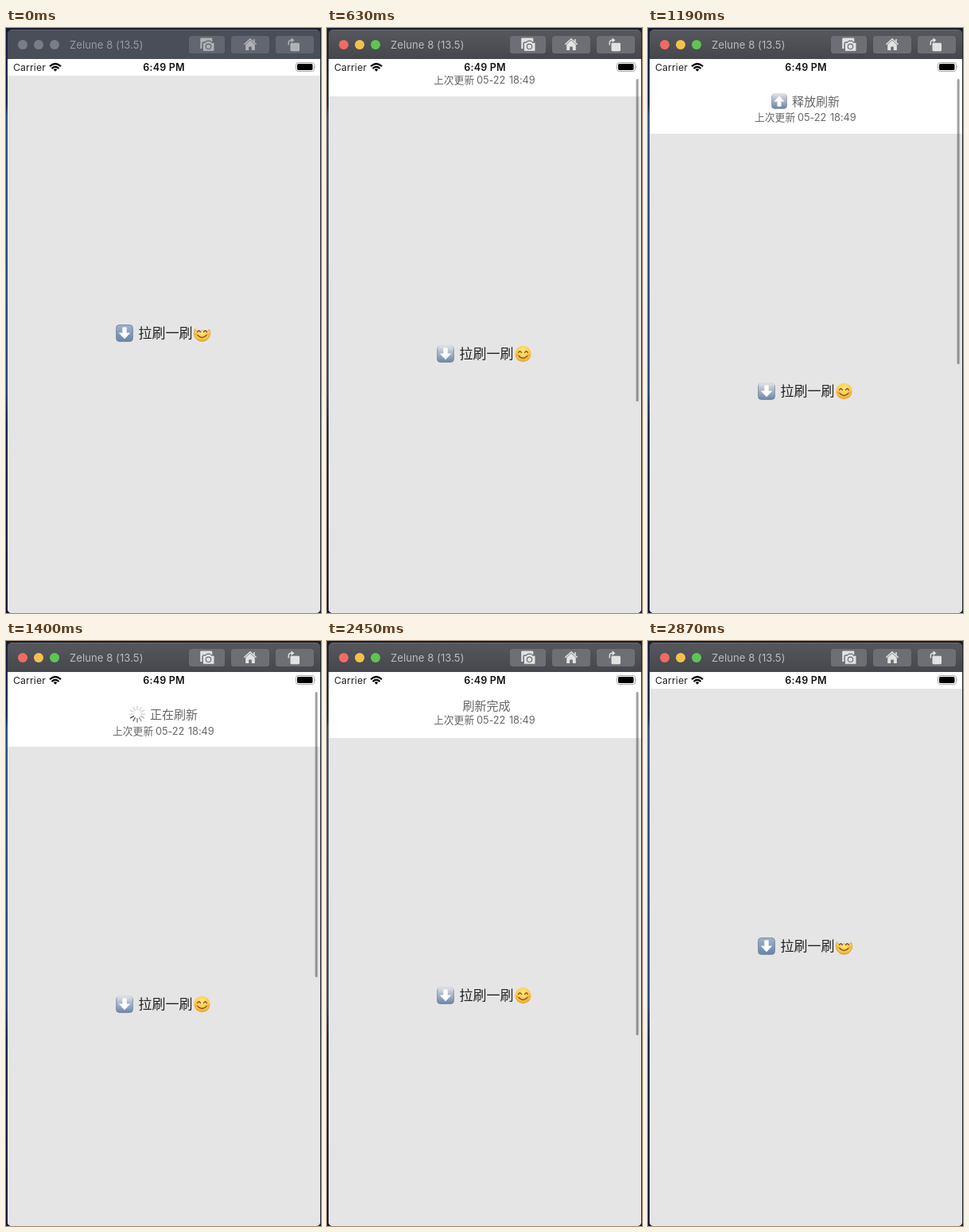
These frames come from a looping animation (396x736 px, 2940 ms). An HTML page:

```html
<!DOCTYPE html>
<html lang="zh">
<head>
<meta charset="utf-8">
<title>Pull to refresh</title>
<style>
  html, body { margin: 0; width: 100%; height: 100%; overflow: hidden; background: #1a2648; }
  svg { display: block; width: 396px; height: 736px; }
  text { font-family: Inter, "Noto Sans CJK SC", "Noto Sans CJK", sans-serif; }
  .name { font-size: 13px; letter-spacing: .1px; fill: #999ba1; }
  .bar { fill: #4a4e58; }
  .light { fill: #7a7d85; }
  .button { fill: #626670; }
  .icon { fill: #afb1b5; stroke: none; }
  .line { fill: none; stroke: #afb1b5; }
  .cut { stroke: #626670; }
  .active .name { fill: #bbbcbf; }
  .active .bar { fill: url(#chrome); }
  .active .button { fill: #6d6f74; }
  .active .icon { fill: #e2e2e3; }
  .active .line { stroke: #e2e2e3; }
  .active .cut { stroke: #6d6f74; }
  .active .red { fill: #ee6c60; }
  .active .yellow { fill: #f5c04f; }
  .active .green { fill: #5fc454; }
  .soft .flat, .full { display: none; }
  .soft .full { display: inline; }
  .box { fill: url(#blue); stroke: #7188a6; }
  .soft .box { fill: url(#fade); stroke: url(#edge); }
</style>
</head>
<body>
<svg id="stage" viewBox="0 0 396 736">
  <defs>
    <linearGradient id="desk" x2="0" y2="1">
      <stop offset="0" stop-color="#151c33"/>
      <stop offset=".13" stop-color="#1b2950"/>
      <stop offset=".15" stop-color="#304d8c"/>
      <stop offset=".62" stop-color="#2a4380"/>
      <stop offset=".68" stop-color="#18244a"/>
      <stop offset="1" stop-color="#141a30"/>
    </linearGradient>
    <linearGradient id="chrome" x2="0" y2="1">
      <stop offset="0" stop-color="#56585d"/>
      <stop offset="1" stop-color="#45474c"/>
    </linearGradient>
    <linearGradient id="blue" x2="0" y2="1">
      <stop offset="0" stop-color="#a3b4c9"/>
      <stop offset="1" stop-color="#6584aa"/>
    </linearGradient>
    <linearGradient id="fade" x2="0" y2="1">
      <stop offset="0" stop-color="#e3e5e8"/>
      <stop offset=".35" stop-color="#b5c0cf"/>
      <stop offset="1" stop-color="#6d87a9"/>
    </linearGradient>
    <linearGradient id="edge" x2="0" y2="1">
      <stop offset="0" stop-color="#d5d8dc"/>
      <stop offset=".2" stop-color="#8999ae"/>
      <stop offset="1" stop-color="#6c819d"/>
    </linearGradient>
    <radialGradient id="sun" cx=".5" cy=".3" r=".75">
      <stop offset="0" stop-color="#ffe680"/>
      <stop offset=".6" stop-color="#fbc94b"/>
      <stop offset="1" stop-color="#e39a32"/>
    </radialGradient>
    <clipPath id="window"><rect x="2" y="2" width="393" height="734" rx="5"/></clipPath>
    <rect id="tile" class="box" x="-10.3" y="-10.3" width="20.6" height="20.6" rx="3.5"/>
    <path id="arrow" d="M-2.7-7.5H2.7V-.5H7.3L0 7.3-7.3-.5H-2.7Z" fill="#fff"/>
  </defs>

  <rect width="396" height="736" fill="url(#desk)"/>
  <rect width="396" height="2" fill="#161b2c"/>
  <rect x="395" width="1" height="736" fill="#20242f"/>

  <g clip-path="url(#window)">
    <rect x="2" y="39" width="393" height="697" fill="#fff"/>

    <g id="header" fill="#666">
      <g id="hint">
        <use href="#tile" transform="translate(165 -41) scale(.9)"/>
        <use id="point" href="#arrow"/>
      </g>
      <g id="spinner" transform="translate(165 -41)" stroke="#555" stroke-width="1.7" stroke-linecap="round"></g>
      <text id="title" y="-35.5" font-size="15"></text>
      <text id="stamp" font-size="12.8"><tspan x="134">上次更新</tspan><tspan x="188" letter-spacing="-.1">05-22</tspan><tspan x="229" letter-spacing="-.1">18:49</tspan></text>
    </g>

    <g id="page">
      <rect x="2" y="60" width="393" height="690" fill="#e5e5e5"/>
      <g transform="translate(149 384)">
        <use href="#tile"/>
        <use href="#arrow"/>
      </g>
      <text x="166.5" y="390.3" font-size="17" fill="#222">拉刷一刷</text>
      <g transform="translate(246.5 384)" fill="none" stroke="#815018" stroke-linecap="round">
        <circle class="full" r="10.2" fill="url(#sun)" stroke="none"/>
        <path class="flat" d="M-9-5A10.3 10.3 0 1 0 9-5Q6-1 3-2Q0-5-3-2Q-6-1-9-5Z" fill="url(#sun)" stroke="#cf922f" stroke-width=".6"/>
        <path d="M-6-1.5Q-4-5-2-1.5M2-1.5Q4-5 6-1.5" stroke-width="1.3"/>
        <path d="M-5.5 2.5Q0 8.5 5.5 2.5" stroke-width="1.4"/>
        <path d="M-8 1.5h1.5M6.5 1.5H8" stroke="#f08b45" stroke-width="2" opacity=".6"/>
      </g>
    </g>

    <rect id="scroll" x="388.6" y="64" width="3" rx="1.5" fill="#000" fill-opacity=".37"/>

    <rect x="2" y="39" width="393" height="21" fill="#fff"/>
    <text x="9" y="54" font-size="12.3" letter-spacing=".1" fill="#222">Carrier</text>
    <g fill="none" stroke="#000" stroke-width="2.2">
      <path d="M55 48.3Q62 41.7 69 48.3M57.5 51Q62 46.8 66.5 51"/>
      <path d="M59.7 52.2Q62 50.4 64.3 52.2L62 54.7Z" fill="#000" stroke="none"/>
    </g>
    <text x="198.5" y="54" font-size="12.5" font-weight="600" letter-spacing=".2" text-anchor="middle" fill="#111">6:49 PM</text>
    <rect x="364.5" y="43.5" width="23" height="11" rx="3" fill="none" stroke="#a5a5a5"/>
    <rect x="366" y="45" width="19.5" height="8" rx="1.7"/>
    <path d="M388.7 47.2q1.6 1.8 0 3.6z" fill="#999"/>

    <rect class="bar" x="2" y="2" width="393" height="37"/>
    <path d="M6 2.5H391" stroke="#74777e" stroke-opacity=".6"/>
    <circle class="light red" cx="21" cy="21" r="6"/>
    <circle class="light yellow" cx="41" cy="21" r="6"/>
    <circle class="light green" cx="61" cy="21" r="6"/>
    <text class="name" x="80" y="25.7">Zelune 8 (13.5)</text>
    <rect class="button" x="230" y="10" width="45" height="22" rx="3.5"/>
    <rect class="button" x="283" y="10" width="48" height="22" rx="3.5"/>
    <rect class="button" x="339" y="10" width="48" height="22" rx="3.5"/>

    <path class="icon" d="M245.5 12.5H258a1.3 1.3 0 0 1 1.3 1.3V26H244.2V13.8a1.3 1.3 0 0 1 1.3-1.3Z"/>
    <path class="icon cut" style="stroke-width:1" d="M248.5 18H251l1.2-1.7h4.6L258 18h2.7a1.3 1.3 0 0 1 1.3 1.3V28a1.3 1.3 0 0 1-1.3 1.3H248.5a1.3 1.3 0 0 1-1.3-1.3V19.3a1.3 1.3 0 0 1 1.3-1.3Z"/>
    <circle class="cut" cx="254.5" cy="23.3" r="3.2" fill="none" stroke-width="1.2"/>
    <path class="cut" d="M247.2 28V18H251l1.2-1.7h4.6L258 18h3" fill="none" stroke-width="1"/>
    <path class="icon" d="M301.2 20.8 307 15.6l5.8 5.2V28H308.8V23.5H305.2V28H301.2Z"/>
    <path class="line" d="M299.3 20.7 307 13.8 314.7 20.7M312 14v3.5" stroke-width="1.5"/>
    <rect class="icon" x="357.5" y="18.8" width="11.5" height="10.4" rx="1.4"/>
    <path class="line" d="M355.3 21.5V18.5Q355.3 15.3 359 15.3" stroke-width="1.5"/>
    <path class="icon" d="M358.5 12.2 362.5 15.3 358.5 18.4Z"/>
  </g>
</svg>
<script>
  const LOOP = 2940, STEP = 70;
  const $ = id => document.getElementById(id);
  const stage = $('stage'), header = $('header'), hint = $('hint'), point = $('point');
  const spinner = $('spinner'), title = $('title'), stamp = $('stamp');
  const page = $('page'), scroll = $('scroll');

  const pull = [[300, 0], [630, 26], [910, 55], [1190, 73], [1330, 74], [1400, 73],
    [1540, 65], [1610, 63], [2030, 63], [2100, 62]];
  const barEnd = [[1400, 423], [1610, 472], [2030, 472], [2170, 496]];

  const spokes = Array.from({ length: 12 }, (_, i) => {
    const line = document.createElementNS('http://www.w3.org/2000/svg', 'line');
    line.setAttribute('y1', -5.5);
    line.setAttribute('y2', -9.7);
    line.setAttribute('transform', `rotate(${i * 30})`);
    return spinner.appendChild(line);
  });

  function track(keys, t) {
    if (t <= keys[0][0]) return keys[0][1];
    for (let i = 1; i < keys.length; i++) {
      const [a, from] = keys[i - 1], [b, to] = keys[i];
      if (t <= b) return from + (to - from) * (t - a) / (b - a);
    }
    return keys[keys.length - 1][1];
  }

  function offsetAt(t) {
    const k = Math.min(1, Math.max(0, (t - 2520) / 320));
    return track(pull, t) * (1 - k * k * (3 - 2 * k));
  }

  function phaseAt(t) {
    if (t < 1000) return 'pull';
    if (t < 1400) return 'release';
    return t < 2100 ? 'busy' : 'done';
  }

  const labels = { pull: '下拉刷新', release: '释放刷新', busy: '正在刷新', done: '刷新完成' };
  const stampY = { pull: -16.3, release: -16.3, busy: -15.3, done: -18.3 };
  const show = (el, on) => el.style.display = on ? 'inline' : 'none';

  function draw(t) {
    const y = offsetAt(t), phase = phaseAt(t);
    stage.classList.toggle('active', t >= 70);
    stage.classList.toggle('soft', t >= 350 && t < 2870);

    page.setAttribute('transform', `translate(0 ${y})`);
    header.setAttribute('transform', `translate(0 ${60 + y})`);
    title.textContent = labels[phase];
    title.setAttribute('x', phase === 'done' ? 170.5 : 181);
    for (const span of stamp.children) span.setAttribute('y', stampY[phase]);

    show(hint, phase === 'pull' || phase === 'release');
    const flip = phase === 'release' ? -1 : 1;
    point.setAttribute('transform', `translate(165 -41) scale(.9 ${.9 * flip})`);

    show(spinner, phase === 'busy');
    const head = 2 + Math.floor((t - 1820) * 12 / 1000);
    spokes.forEach((spoke, i) => {
      const age = ((head - i) % 12 + 12) % 12;
      spoke.setAttribute('stroke-opacity', Math.max(.22, .9 - age * .13));
    });

    const end = t < 1400 ? 496 - y : track(barEnd, t);
    scroll.setAttribute('height', end - 64);
    scroll.setAttribute('opacity', t < 350 ? 0 : Math.min(1, Math.max(0, (2870 - t) / 210)));
  }

  const start = performance.now();
  function tick() {
    const t = (performance.now() - start) % LOOP;
    draw(Math.floor(t / STEP) * STEP);
    requestAnimationFrame(tick);
  }
  tick();
</script>
</body>
</html>
```
